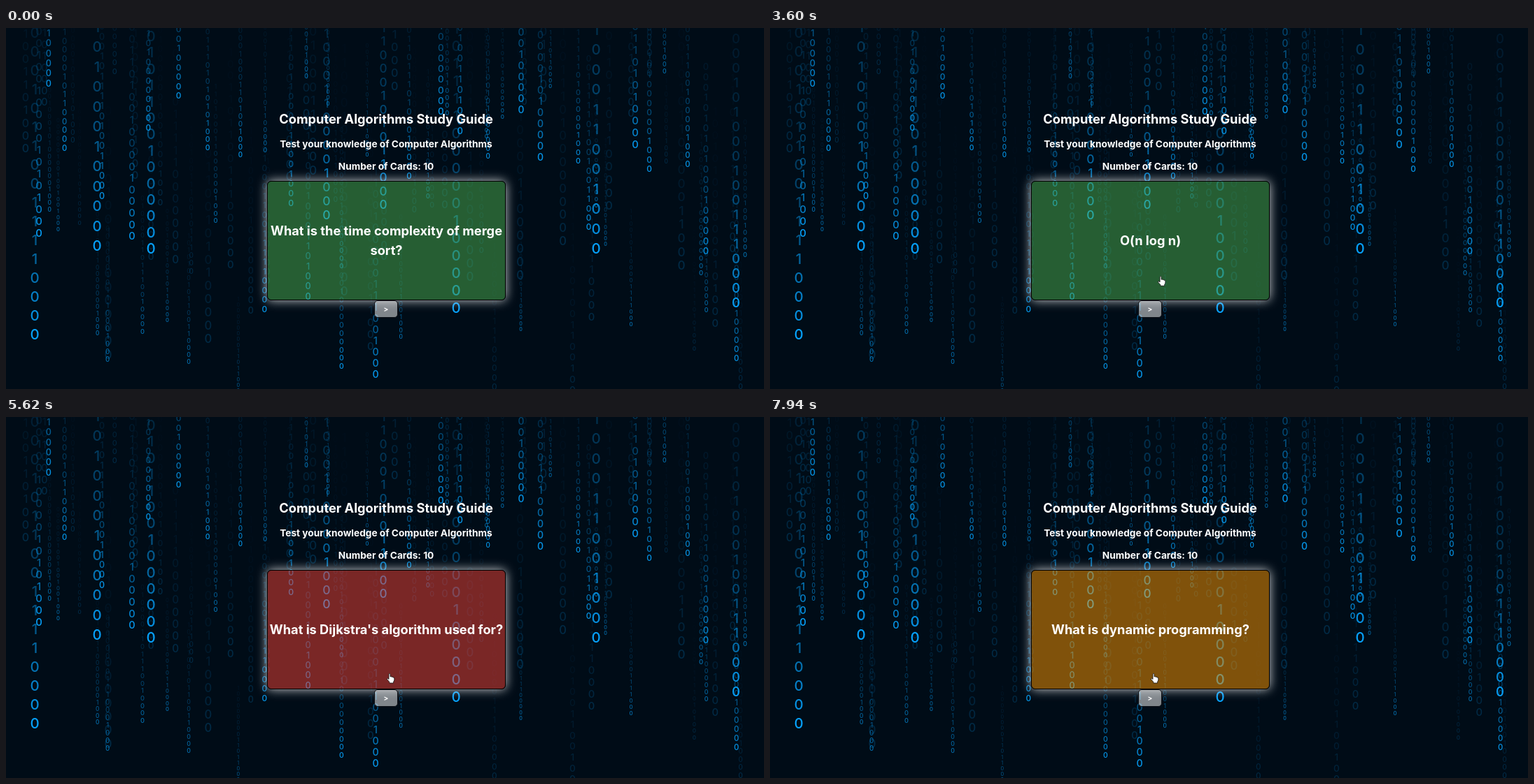
Recreate the animation shown at these times as an HTML page with a canvas. Size 1083x517 px, loop 8000 ms.

```html
<!DOCTYPE html>
<html lang="en">
<head>
<meta charset="utf-8">
<title>Study Guide</title>
<style>
  html, body { margin: 0; width: 100%; height: 100%; overflow: hidden; background: #000c17; }
  #stage { position: relative; width: 1083px; height: 517px; overflow: hidden;
    color: #fff; font: 700 18.24px/27.36px Inter, sans-serif; text-align: center; }
  #stage > * { position: absolute; box-sizing: border-box; margin: 0; }
  canvas { left: 0; top: 0; }
  h2, h3 { left: 0; width: 1086px; font-size: 18.24px; }
  h3 { font-size: 13.68px; }
  #card { left: 373px; top: 219px; width: 341px; height: 171px; display: flex;
    align-items: center; justify-content: center; white-space: pre;
    border: 1px solid #000; border-radius: 6px; box-shadow: 0 0 15px rgba(255,255,255,.8); }
  #next { left: 526px; top: 390px; width: 34px; height: 25px; border: 1px solid #0b0f14;
    border-radius: 5px; background: rgba(255,255,255,.5); font-size: 10px; line-height: 22px; }
  #cursor { left: 0; top: 0; width: 14px; height: 18px; overflow: visible; }
  #cursor path { fill: #fff; stroke: #111; stroke-width: .8; stroke-linejoin: round; }
</style>
</head>
<body>
<div id="stage">
  <canvas width="1083" height="517"></canvas>
  <h2 style="top:117px">Computer Algorithms Study Guide</h2>
  <h3 style="top:153px">Test your knowledge of Computer Algorithms</h3>
  <h3 style="top:185px">Number of Cards: 10</h3>
  <div id="card"></div>
  <div id="next">&gt;</div>
  <svg id="cursor">
    <path id="arrow" d="M0 0V10.5L2.4 8.3 4 12 5.9 11.2 4.3 7.6H7.6Z"/>
    <path id="hand" d="M0 1.2Q1-.6 2 1.2V5Q3.2 4 4 5.3 5.2 4.6 6 6 7.4 5.5 7.8 7V10L6.6 12.2V14H.8V12.4L-2.6 8.6Q-2.6 7-1.2 7.6L0 8.6Z"/>
  </svg>
</div>
<script>
const $ = id => document.getElementById(id);
const LOOP = 8000;

let seed = 17;
const random = () => (seed = seed * 16807 % 2147483647) / 2147483647;
const between = (low, high) => low + (high - low) * random();

const ctx = document.querySelector('canvas').getContext('2d');
ctx.textAlign = 'center';
ctx.textBaseline = 'middle';
ctx.fillStyle = '#06a4ff';

// A falling column: bright zeros at the bottom, fading upwards
function drawColumn(x, bottom, step, strength) {
  ctx.font = `500 ${Math.min(20.5, step * .88)}px Inter, sans-serif`;
  for (let i = 0; i < 19; i++) {
    const digit = i < 3 || random() < .6 ? '0' : '1';
    ctx.globalAlpha = strength * Math.exp(-i * .13);
    ctx.fillText(digit, x, bottom - i * step);
  }
}

function drawLayer(count, strength, minStep, maxStep) {
  const gap = 1040 / count;
  for (let i = 0; i < count; i++) {
    const x = 28 + gap * (i + random());
    drawColumn(x, between(60, 540), between(minStep, maxStep), strength);
  }
}

drawLayer(44, .2, 9, 20);
drawLayer(28, .65, 8, 11);
drawLayer(26, .9, 11, 17);

// The most prominent columns: x, bottom, row spacing
const LARGE = [
  [41, 440, 27], [47, 294, 17], [130, 313, 28.5], [207, 317, 23.4], [458, 269, 20],
  [539, 254, 19.5], [643, 402, 25], [843, 317, 28.5], [1043, 394, 21]
];
LARGE.forEach(([x, bottom, step]) => drawColumn(x, bottom, step, .98));

const GREEN = '76,175,80', RED = '244,67,54', ORANGE = '255,152,0';
const MERGE_SORT = 'What is the time complexity of merge\nsort?';
const CARDS = [
  [0, GREEN, MERGE_SORT],
  [3400, GREEN, 'O(n log n)'],
  [3950, GREEN, MERGE_SORT],
  [4800, RED, "What is Dijkstra's algorithm used for?"],
  [6500, RED, 'To find the shortest paths from a\nsource vertex to all other vertices in a\nweighted graph.'],
  [7300, ORANGE, 'What is dynamic programming?']
];

// Pointer moves: start, end, where the tip comes to rest
const ENTRY = 120;
const BUTTON = [543, 402], CARD = [551, 355], BELOW_TEXT = [547, 367];
const MOVES = [
  [ENTRY, 860, [530, 164]],
  [860, 1000, [356, 150]],
  [1000, 1280, [555, 145]],
  [1280, 1480, [638, 114]],
  [1480, 1760, [488, 148]],
  [1760, 2050, [642, 131]],
  [2050, 2800, [567, 376]],
  [2800, 3090, [559, 354]],
  [3260, 4160, [553, 358]],
  [4160, 4700, BUTTON],
  [4920, 5270, BELOW_TEXT],
  [5760, 5900, BUTTON],
  [6300, 6710, CARD],
  [7060, 7300, BUTTON],
  [7800, 7940, BELOW_TEXT]
];

function pointerAt(t) {
  let [x, y] = [1052, 505];
  for (const [start, end, [toX, toY]] of MOVES) {
    const k = Math.min(1, Math.max(0, (t - start) / (end - start)));
    const eased = k * k * (3 - 2 * k);
    x += (toX - x) * eased;
    y += (toY - y) * eased;
  }
  return [x, y];
}

let shown;
function render(t) {
  const card = CARDS.filter(c => c[0] <= t).pop();
  if (card !== shown) {
    shown = card;
    $('card').style.background = `rgba(${card[1]},.5)`;
    $('card').textContent = card[2];
  }
  const [x, y] = pointerAt(t);
  const clickable = x > 373 && x < 714 && y > 219 && y < 415;
  $('cursor').style.display = t < ENTRY ? 'none' : '';
  $('cursor').style.transform = `translate(${x}px,${y}px)`;
  $('hand').style.display = clickable ? '' : 'none';
  $('arrow').style.display = clickable ? 'none' : '';
}

const start = performance.now();
function frame() {
  render((performance.now() - start) % LOOP);
  requestAnimationFrame(frame);
}
frame();
</script>
</body>
</html>
```
